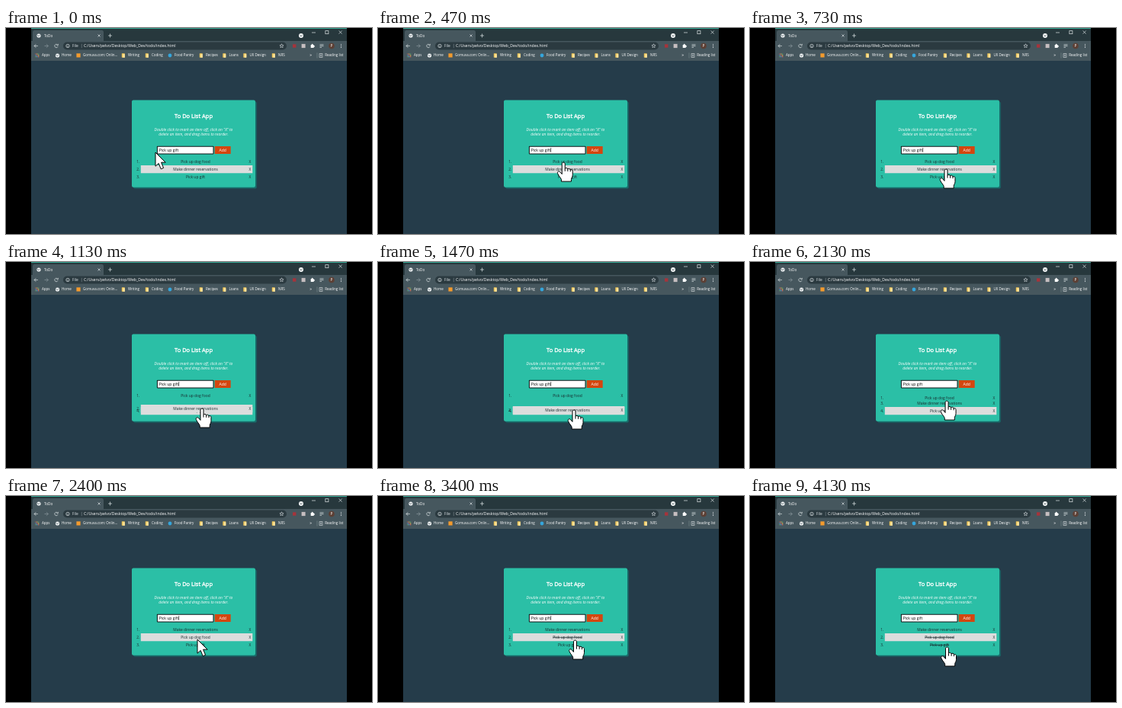
An HTML page with a canvas that plays this animation: 480 px wide and 270 px high, repeating every 4190 ms.

```html
<!DOCTYPE html>
<html lang="en">
<head>
<meta charset="utf-8">
<title>ToDo</title>
<style>
  html, body { margin: 0; width: 100%; height: 100%; overflow: hidden; background: #000; }
  canvas { display: block; width: 480px; height: 270px; }
</style>
</head>
<body>
<canvas id="stage"></canvas>
<script>
const W = 480, H = 270, LOOP = 4190, TICK = 1000 / 15;
const FONT = '"Open Sans", "Noto Sans", sans-serif';
const INK = '#18282b', PALE = '#dfe5e7', BAR = '#46575e', STRIP = '#27383d', DIM = '#8b989e';

const canvas = document.getElementById('stage');
const ctx = canvas.getContext('2d');
const ratio = window.devicePixelRatio || 1;
canvas.width = W * ratio;
canvas.height = H * ratio;

// Pointer hot spot: [tick, x, y]
const PATH = [
  [0, 196, 163], [8, 250, 178], [9, 254, 186], [11, 257, 185], [15, 257, 185],
  [17, 257, 192], [20, 257, 194], [22, 257, 194], [26, 258.6, 178.6], [31, 258.6, 178.6],
  [34, 257, 189], [36, 251, 188], [40, 251, 188], [44, 258.5, 189], [53, 258.5, 189],
  [56, 258.5, 198], [63, 258.5, 198]
];

const within = (k, from, to) => k >= from && k < to;

function pointerAt(k) {
  const i = Math.max(1, PATH.findIndex(p => p[0] >= k));
  const [t0, x0, y0] = PATH[i - 1], [t1, x1, y1] = PATH[i];
  const u = (k - t0) / (t1 - t0);
  return { x: x0 + (x1 - x0) * u, y: y0 + (y1 - y0) * u };
}

function rect(x, y, w, h, fill, r = 0) {
  ctx.fillStyle = fill;
  ctx.beginPath();
  ctx.roundRect(x, y, w, h, r);
  ctx.fill();
}

function disc(x, y, r, fill) {
  ctx.fillStyle = fill;
  ctx.beginPath();
  ctx.arc(x, y, r, 0, Math.PI * 2);
  ctx.fill();
}

function ring(x, y, r, color, from = 0, to = Math.PI * 2) {
  ctx.strokeStyle = color;
  ctx.lineWidth = 0.7;
  ctx.beginPath();
  ctx.arc(x, y, r, from, to);
  ctx.stroke();
}

function line(points, color, width = 0.7) {
  ctx.strokeStyle = color;
  ctx.lineWidth = width;
  ctx.beginPath();
  points.forEach(([x, y]) => ctx.lineTo(x, y));
  ctx.stroke();
}

// y is the middle of the capitals
function text(s, x, y, size, color, align = 'left', style = '') {
  ctx.font = `${style} ${size}px ${FONT}`;
  ctx.textAlign = align;
  ctx.fillStyle = color;
  ctx.fillText(s, x, y + size * 0.35);
}

function cross(x, y, r, color) {
  line([[x - r, y - r], [x + r, y + r]], color);
  line([[x - r, y + r], [x + r, y - r]], color);
}

function globe(x, y) {
  disc(x, y, 2.6, '#f1f4f5');
  line([[x - 2, y - 0.5], [x, y + 0.6], [x + 1.6, y - 0.8]], BAR, 0.8);
}

function folder(x, y) {
  rect(x - 2, y - 2.7, 4, 5.4, '#f0c75a', 0.4);
  rect(x - 0.4, y - 1.8, 2.4, 4.5, '#f9e3a0', 0.3);
}

function drawTabs() {
  rect(33, 0, 414, 17, STRIP);
  rect(33, 0, 414, 1, '#35a793');
  rect(35, 3, 93, 16, BAR, 2.5);
  globe(43, 10);
  text('ToDo', 50, 10, 4.7, '#fff');
  cross(122, 10, 1.5, PALE);
  line([[134, 10], [139, 10]], PALE);
  line([[136.5, 7.5], [136.5, 12.5]], PALE);
  disc(387, 10, 3, '#f1f4f5');
  line([[385.7, 9.5], [387, 10.8], [388.3, 9.5]], STRIP, 0.9);
  line([[401, 6], [406, 6]], PALE);
  ctx.lineWidth = 0.7;
  ctx.strokeStyle = PALE;
  ctx.strokeRect(418.9, 3.7, 4, 4);
  cross(438.6, 5.6, 2, PALE);
}

function drawToolbar() {
  rect(33, 17, 414, 26, BAR);
  line([[41.8, 23.5], [37, 23.5]], PALE);
  line([[39.3, 21.2], [37, 23.5], [39.3, 25.8]], PALE);
  line([[50.5, 23.5], [55.3, 23.5]], DIM);
  line([[53, 21.2], [55.3, 23.5], [53, 25.8]], DIM);
  ring(66, 23.5, 2.2, PALE, 0.4, 5.5);
  line([[68.3, 20.8], [68.3, 22.7], [66.4, 22.7]], PALE);

  rect(75, 18.5, 293, 10, '#2b3a40', 5);
  ring(81, 23.5, 2.2, PALE);
  line([[81, 23], [81, 24.8]], PALE);
  text('File', 87, 23.4, 4.9, PALE);
  line([[99.3, 20.8], [99.3, 26.2]], DIM, 0.5);
  text('C:/Users/pelvo/Desktop/Web_Dev/todo/index.html', 102, 23.4, 5.12, '#fff');
  star(361.5, 23.5);

  rect(376, 21.3, 4.4, 4.4, '#a5343c');
  rect(387.6, 20.9, 5, 5.2, '#c6bec0');
  puzzle(402, 23.6);
  for (let i = 0; i < 3; i++) {
    line([[411.5, 21.8 + i * 1.8], [i < 2 ? 416.5 : 414, 21.8 + i * 1.8]], PALE);
  }
  disc(427, 23.5, 3.8, '#5d4035');
  text('P', 427, 23.4, 4.6, '#fff', 'center');
  for (let i = -1; i < 2; i++) disc(439.5, 23.5 + i * 1.9, 0.6, PALE);
}

function star(x, y) {
  const points = [];
  for (let i = 0; i <= 10; i++) {
    const r = i % 2 ? 1.2 : 2.7, a = i * Math.PI / 5 - Math.PI / 2;
    points.push([x + r * Math.cos(a), y + r * Math.sin(a)]);
  }
  line(points, PALE, 0.6);
}

function puzzle(x, y) {
  rect(x - 2.3, y - 1.7, 4, 4, '#fff', 0.5);
  disc(x - 0.3, y - 2, 0.9, '#fff');
  disc(x + 2, y + 0.3, 0.9, '#fff');
}

function drawBookmarks() {
  const label = (s, x) => text(s, x, 35.8, 4.5, '#fff');
  const colors = ['#e06a5b', '#e9c355', '#5fae73', '#5b93d8'];
  for (let i = 0; i < 9; i++) {
    rect(38.5 + i % 3 * 1.8, 33.4 + Math.floor(i / 3) * 1.8, 1.2, 1.2, colors[i % 4]);
  }
  label('Apps', 47);
  globe(67.5, 36);
  label('Home', 73);
  rect(92.4, 33.3, 5.2, 5.2, '#f39a2d');
  label('Gomuva.com: Onlin...', 101);
  disc(215, 36, 2.4, '#35a6dc');
  label('Food Pantry', 221);
  [['Writing', 160], ['Coding', 191], ['Recipes', 262], ['Loans', 292.5],
   ['UX Design', 319.5], ['NRS', 357]].forEach(([name, x]) => {
    folder(x - 6.2, 36);
    label(name, x);
  });
  text('»', 399.5, 35.5, 5.5, '#fff', 'center');
  line([[408, 32.5], [408, 39.5]], DIM, 0.5);
  ctx.strokeStyle = PALE;
  ctx.lineWidth = 0.6;
  ctx.strokeRect(411, 33.7, 4, 4.6);
  line([[412, 35.2], [414, 35.2]], PALE, 0.6);
  line([[412, 36.7], [414, 36.7]], PALE, 0.6);
  label('Reading list', 418.3);
}

function drawCard(caret) {
  rect(167, 96.5, 161.8, 114, '#196a69', 2);
  rect(165, 94.4, 162, 114.4, '#2bbfa6', 2);

  text('To Do List App', 246, 115.5, 7.5, '#fff', 'center');
  ctx.strokeStyle = '#fff';
  ctx.lineWidth = 0.35;
  ctx.strokeText('To Do List App', 246, 115.5 + 7.5 * 0.35);
  text('Double click to mark an item off, click on "X" to', 246, 133, 5, '#fff', 'center', 'italic');
  text('delete an item, and drag items to reorder.', 246, 139.3, 5, '#fff', 'center', 'italic');

  rect(197.9, 154.8, 74.6, 10.6, '#0d1416', 0.8);
  rect(198.9, 155.8, 72.6, 8.6, '#fff');
  text('Pick up gift', 200.7, 159.8, 5, '#000');
  if (caret) line([[226.7, 157], [226.7, 162.8]], '#000', 0.6);
  rect(273.7, 155, 21, 10, '#d4460f');
  text('Add', 284.2, 159.8, 5, '#fff', 'center');
}

function row(name, number, y, striped, done) {
  if (striped) rect(176.8, y - 5, 146.5, 10.2, '#dcdddd');
  text(number + '.', 175.3, y, 4.8, INK, 'right');
  text('X', 320, y, 4.8, INK, 'center');
  text(name, 248.5, y, 4.95, INK, 'center');
  if (done) {
    const half = ctx.measureText(name).width / 2;
    line([[248.5 - half, y + 0.4], [248.5 + half, y + 0.4]], INK, 0.6);
  }
}

function drawList(k, pointer) {
  const dog = 'Pick up dog food', dinner = 'Make dinner reservations', gift = 'Pick up gift';
  const [y1, y2, y3] = [175, 185, 195];
  // While an item is lifted, its placeholder takes a number of its own.
  if (within(k, 15, 24)) {
    row(dog, 1, y1);
    row(gift, 4, y3, true);
    row(dinner, 2, y2 + pointer.y - 185, true);
  } else if (within(k, 31, 35)) {
    const shift = pointer.y - 178.6, passed = shift > 5;
    row(dinner, passed ? 2 : 3, passed ? y1 : y2, passed);
    row(gift, 4, y3, true);
    row(dog, 1, y1 + shift);
  } else {
    const swapped = k >= 35;
    row(swapped ? dinner : dog, 1, y1);
    row(swapped ? dog : dinner, 2, y2, true, k >= 47);
    row(gift, 3, y3, false, k >= 62);
  }
}

const ARROW = new Path2D('M0 0V18.2L4.2 14.4L7.2 21.8L10.6 20.4L7.6 13.2H13.2Z');
const HAND = new Path2D(
  'M-2 2C-2 -.6 2 -.6 2 2V8.4C2.6 6.9 5.4 7 5.6 9C6.4 7.6 8.8 8 9 10' +
  'C10 9 12 9.6 12 11.6V16.5C12 19 10.2 20.4 10.2 22.4V25H-2.8V22.4' +
  'C-3.6 20 -6 18.4 -7.6 14.6C-8.6 12.2 -6 10.8 -4.4 12.6L-2 15.4Z');
const KNUCKLES = new Path2D('M2 8.4V11.6M5.6 9V11.8M9 10V12.2');

function drawPointer(k, { x, y }) {
  const hand = y > 170 && !within(k, 35, 42);
  ctx.save();
  ctx.translate(x, y);
  ctx.lineJoin = 'round';
  ctx.lineWidth = 1;
  ctx.fillStyle = '#fff';
  ctx.strokeStyle = '#000';
  ctx.fill(hand ? HAND : ARROW);
  ctx.stroke(hand ? HAND : ARROW);
  if (hand) ctx.stroke(KNUCKLES);
  ctx.restore();
}

function draw(now) {
  const k = Math.floor((now % LOOP + 7) / TICK);
  const pointer = pointerAt(k);
  ctx.setTransform(ratio, 0, 0, ratio, 0, 0);
  rect(0, 0, W, H, '#000');
  rect(33, 43, 414, 227, '#253c4a');
  drawTabs();
  drawToolbar();
  drawBookmarks();
  drawCard(within(k, 5, 23) || within(k, 33, 56));
  drawList(k, pointer);
  drawPointer(k, pointer);
}

const start = performance.now();
function loop() {
  draw(performance.now() - start);
  requestAnimationFrame(loop);
}
loop();
</script>
</body>
</html>
```
